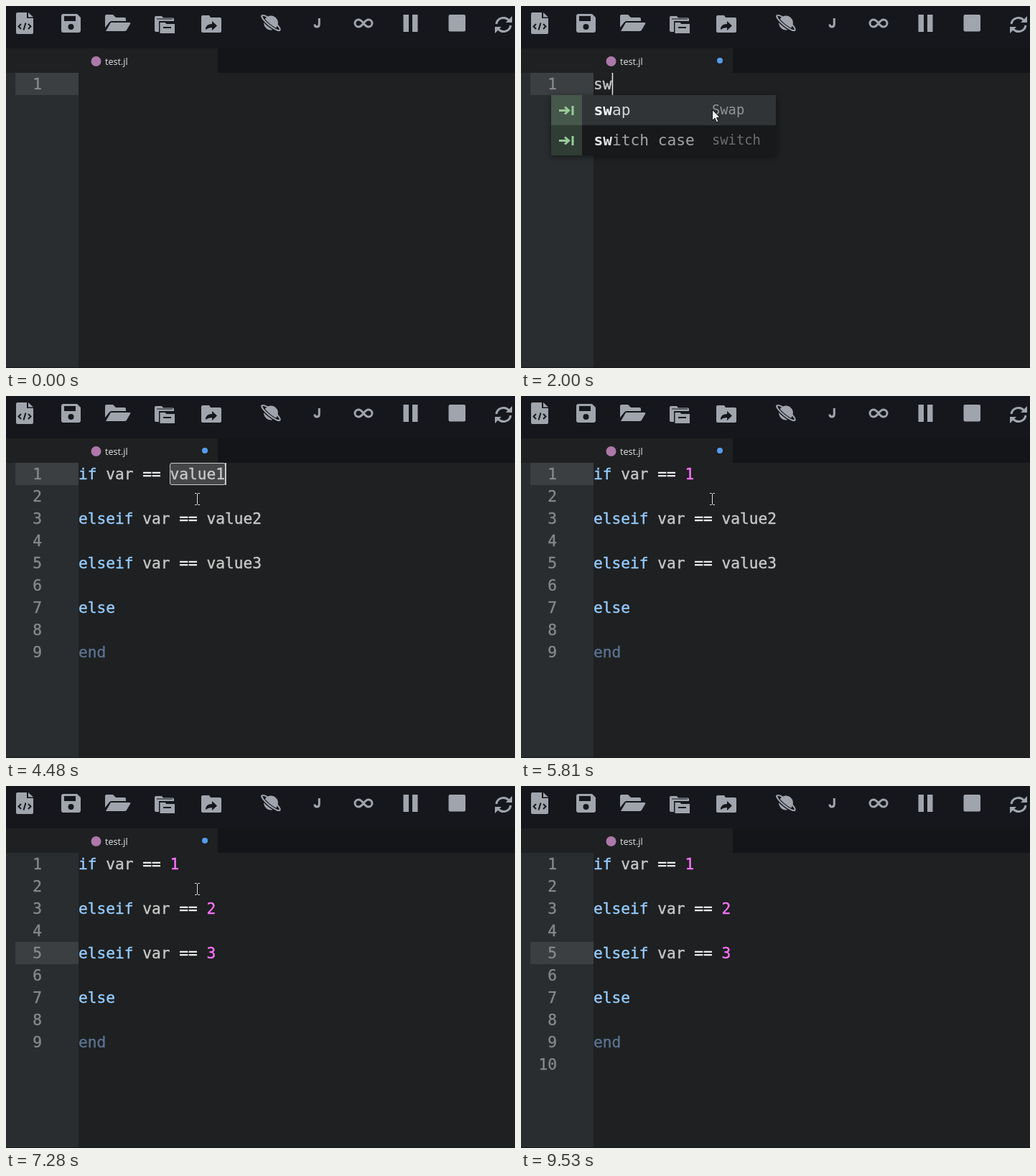
Animation of 709x504 px, one loop 9.77 s. Source, as an HTML page:

```html
<!DOCTYPE html>
<html lang="en">
<head>
<meta charset="utf-8">
<title>Snippet completion</title>
<style>
html, body { margin: 0; width: 100%; height: 100%; overflow: hidden; background: #1e2021; }
svg { display: block; width: 709px; height: 504px; }
text { white-space: pre; }
.code text { font: 21.18px "DejaVu Sans Mono", monospace; fill: #c5c8c6; }
#page text { stroke: #c5c8c6; stroke-width: .4px; }
#page .num { fill: #85898b; stroke: #85898b; text-anchor: end; }
#page .kw { fill: #96cbfe; stroke: #96cbfe; }
#page .end { fill: #5b7290; stroke: #5b7290; }
#page .op { fill: #f4f4f4; stroke: #f4f4f4; }
#page .lit { fill: #ff73fd; stroke: #ff73fd; }
.code .match { font-weight: bold; fill: #e4e6e6; }
.code .hint { font-size: 18.8px; fill: #6b6d6f; }
.code .item { fill: #a2a4a5; }
.code .on .item { fill: #d3d5d6; }
.code .on .match { fill: #fff; }
.code .on .hint { fill: #919496; }
.mark { fill: #444647; stroke: #c9cbcb; }
.ink { fill: #a0a5ad; }
.line { fill: none; stroke: #a0a5ad; stroke-width: 3; }
.cut { fill: #16171c; }
.slit { fill: none; stroke: #16171c; stroke-width: 2; }
#popup { filter: drop-shadow(0 2px 4px rgba(0,0,0,.45)); }
</style>
</head>
<body>
<svg viewBox="0 0 709 504">
  <rect width="709" height="504" fill="#1e2021"/>
  <rect width="709" height="59" fill="#16171c"/>
  <rect x="295" y="59" width="414" height="34" fill="#131519"/>
  <rect y="93" width="101" height="411" fill="#292d30"/>

  <g class="ink">
    <path d="M16 9h13v8h9v20q0 2-2 2H16q-2 0-2-2V11q0-2 2-2zM31 9l7 6.5h-7z"/>
    <path class="slit" d="M21 25l-3.5 3.5 3.5 3.5M31 25l3.5 3.5-3.5 3.5M27.5 23.5l-3 10"/>

    <path d="M80 11h19l5 5v18q0 3-3 3H80q-3 0-3-3V14q0-3 3-3z"/>
    <path class="cut" d="M81 14h16v7H81z"/>
    <circle class="cut" cx="90.5" cy="29" r="4"/>

    <path d="M138 30V14q0-2 2-2h9l4 4h12q2 0 2 2v3h-20q-2 0-3 1.5z"/>
    <path d="M146 23h26q2 0 1 2l-5 8.5q-1 1.5-3 1.500H139z"/>

    <path d="M207 16q0-2 2-2h8l2 2.500h13q2 0 2 2V21h-21v15h-4q-2 0-2-2z"/>
    <path class="slit" d="M210 18h22" style="stroke-width:1"/>
    <path d="M214.500 23h7l2 2h11.500v13h-20.500z"/>
    <path class="slit" d="M219 30h11"/>

    <path d="M272 15q0-2 2-2h9l2 3h13q2 0 2 2v17q0 2-2 2h-24q-2 0-2-2z"/>
    <path class="cut" d="M278 33q0-8 9-8v-4l7 6.500-7 6.500v-4q-5 0-9 3z"/>

    <g transform="rotate(39 369 23.500)">
      <ellipse class="line" cx="369" cy="23.500" rx="16" ry="4" style="stroke-width:2"/>
      <circle cx="369" cy="23.500" r="10"/>
      <path class="slit" d="M356 26a16 4 0 0 0 26 0" style="stroke-width:4.500"/>
      <path class="line" d="M353 23.500a16 4 0 0 0 32 0" style="stroke-width:2"/>
    </g>

    <path class="line" d="M430 25.500q0 3.500 3 3.500t3.300-3.500V17"/>
    <path class="line" d="M498 24c-3-4-5-5-7-5a5 5 0 0 0 0 10c2 0 4-1 7-5s5-5 7-5a5 5 0 0 1 0 10c-2 0-4-1-7-5z"/>
    <path d="M553.500 12h7.500v24h-7.500zM566 12h7.500v24H566z"/>
    <rect x="616.500" y="12" width="23.500" height="23.500" rx="2"/>
    <path class="line" d="M683 25a10 10 0 0 1 17.500-5M703 27a10 10 0 0 1-17.500 5"/>
    <path d="M705 14v9h-9zM681 38v-9h9z"/>
  </g>

  <circle cx="125.500" cy="77" r="7" fill="#ad78aa"/>
  <text x="138" y="82" fill="#e4e6e8" style="font:12.6px 'Open Sans',sans-serif">test.jl</text>
  <circle id="dirty" cx="277" cy="76" r="4" fill="#569cee"/>

  <g class="code">
    <g id="page"></g>
    <g id="caret" fill="#e8e8e8"></g>
    <g id="popup"></g>
  </g>

  <path d="M0 503.500h709" stroke="#17191b"/>
  <g id="mouse">
    <g id="beam" fill="none">
      <path d="M-3.500-8h2.500l1 1 1-1h2.500M0-7.500v15M-3.500 8h2.500l1-1 1 1h2.500" stroke="#111" stroke-width="2.600"/>
      <path d="M-3.500-8h2.500l1 1 1-1h2.500M0-7.500v15M-3.500 8h2.500l1-1 1 1h2.500" stroke="#eee"/>
    </g>
    <path id="arrow" d="M0 1v15l3.500-3.300 2.500 5.800 2.500-1-2.500-5.700h4.800z" fill="#f2f2f2" stroke="#111"/>
  </g>
</svg>
<script>
const LOOP = 9770, LEFT = 101, TOP = 93, CHAR = 12.75, ROW = 31, ITEM = 42, TICK = 77;
const $ = id => document.getElementById(id);
const col = n => LEFT + n * CHAR;

const snippet = (a, b, c) =>
  [`if var == ${a}`, '', `elseif var == ${b}`, '', `elseif var == ${c}`, '', 'else', '', 'end'];

const small = [['swap', 'Swap'], ['switch case', 'switch']];
const large = [...small, ['struct', 'Struct'], ['show', 'Show'], ['sort', 'Sort'], ['string', 'String'],
  ['sum', 'Sum'], ['sqrt', 'Sqrt'], ['size', 'Size']];

// spots: [row, caret column, selected length]
const scenes = [
  { at: 0, lines: [''], spots: [[0, 0, 0]] },
  { at: 1620, lines: ['s'], spots: [[0, 1, 0]] },
  { at: 1770, lines: ['s'], spots: [[0, 1, 0]], list: large, width: 372, hint: 290 },
  { at: 2000, lines: ['sw'], spots: [[0, 2, 0]], list: small },
  { at: 2230, lines: ['swi'], spots: [[0, 3, 0]], list: small.slice(1) },
  { at: 2930, lines: snippet('value1', 'value2', 'value3'), spots: [[0, 6, 3], [2, 10, 3], [4, 10, 3]] },
  { at: 4480, lines: snippet('value1', 'value2', 'value3'), spots: [[0, 16, 6]] },
  { at: 5490, lines: snippet(1, 'value2', 'value3'), spots: [[0, 11, 0]] },
  { at: 5890, lines: snippet(1, 'value2', 'value3'), spots: [[2, 20, 6]] },
  { at: 6280, lines: snippet(1, 2, 'value3'), spots: [[2, 15, 0]] },
  { at: 6590, lines: snippet(1, 2, 'value3'), spots: [[4, 20, 6]] },
  { at: 6970, lines: snippet(1, 2, 3), spots: [[4, 15, 0]] },
  { at: 8140, lines: [...snippet(1, 2, 3), ''], spots: [[4, 15, 0]] }
];

const caretOn = [[230, 610], [990, 1370], [1620, 2460], [2930, 3240], [3620, 4020], [4480, 4800],
  [5180, 5810], [5890, 6190], [6280, 6890], [6970, 7280], [7660, 8060], [8140, 8520], [8900, 9290]];

const kind = word => word === 'end' ? 'end' : word === '==' ? 'op' : /\d/.test(word) ? 'lit' : 'kw';
const paint = line => line.replace(/==|\b(?:if|elseif|else|end|\d)\b/g,
  word => `<tspan class="${kind(word)}">${word}</tspan>`);

function drawPage({ lines, spots }) {
  const band = ([row]) => `<rect x="13" y="${TOP + row * ROW}" width="88" height="${ROW}" fill="#3b3f41"/>`;
  const mark = ([row, end, len]) => len ? `<rect class="mark" x="${Math.floor(col(end - len)) + .5}"
    y="${TOP + row * ROW + .5}" width="${Math.round(len * CHAR)}" height="${ROW - 1}" rx="2.5"/>` : '';
  const text = (line, i) => {
    const y = TOP + 23 + i * ROW;
    return `<text class="num" x="50" y="${y}">${i + 1}</text><text x="${LEFT}" y="${y}">${paint(line)}</text>`;
  };
  $('page').innerHTML = spots.map(band).join('') + spots.map(mark).join('') + lines.map(text).join('');
  $('caret').innerHTML = spots.map(([row, end]) =>
    `<rect x="${col(end) + .2}" y="${TOP + row * ROW}" width="1.5" height="${ROW}"/>`).join('');
}

function drawPopup({ lines, list = [], width = 313, hint = 266 }) {
  const typed = lines[0].length;
  $('popup').innerHTML = list.map(([name, label], i) => {
    const y = 124 + i * ITEM, on = i === 0, mid = y + 21.5;
    return `<g class="${on ? 'on' : ''}">
      <rect x="42" y="${y}" width="${width}" height="${ITEM}" fill="${on ? '#303437' : '#18191b'}"/>
      <rect x="42" y="${y}" width="43" height="${ITEM}" fill="${on ? '#46574b' : '#2f3d34'}"/>
      <path d="M53 ${mid}h13M61 ${mid - 5}l5.500 5-5.500 5M72 ${mid - 6.5}v13" fill="none" stroke="#98cc98" stroke-width="3"/>
      <text class="item" x="101.500" y="${y + 28}"><tspan class="match">${name.slice(0, typed)}</tspan>${name.slice(typed)}</text>
      <text class="hint" x="${hint}" y="${y + 27}">${label}</text></g>`;
  }).join('');
}

const mix = (a, b, p) => a + (b - a) * p;
const tick = ms => Math.floor(ms / TICK + .06);

function mousePos(t) {
  if (t < 70 || t >= 9525) return null;
  if (t < 8900) {
    const p = Math.min(1, tick(t - 70) / 8);
    const e = 1 - (1 - p) ** 2;
    return [mix(474, 266, e), mix(380, 143, e)];
  }
  const p = Math.min(1, (tick(t - 8900) + 1) / 8);
  const e = p * p * (3 - 2 * p);
  return [mix(266, 670, e), mix(143, 497, e)];
}

const show = (id, yes) => $(id).setAttribute('visibility', yes ? 'inherit' : 'hidden');
const start = performance.now();
let current;

function frame() {
  const t = (performance.now() - start) % LOOP;
  const scene = scenes.filter(s => s.at <= t).pop();
  if (scene !== current) {
    current = scene;
    drawPage(scene);
    drawPopup(scene);
  }
  show('caret', caretOn.some(([from, to]) => t >= from && t < to));
  show('dirty', t >= 1690 && t < 8220);
  const pos = mousePos(t);
  show('mouse', pos);
  show('beam', pos && !scene.list);
  show('arrow', pos && scene.list);
  if (pos) $('mouse').setAttribute('transform', `translate(${pos.map(v => Math.round(v) + .5)})`);
  requestAnimationFrame(frame);
}
frame();
</script>
</body>
</html>
```
